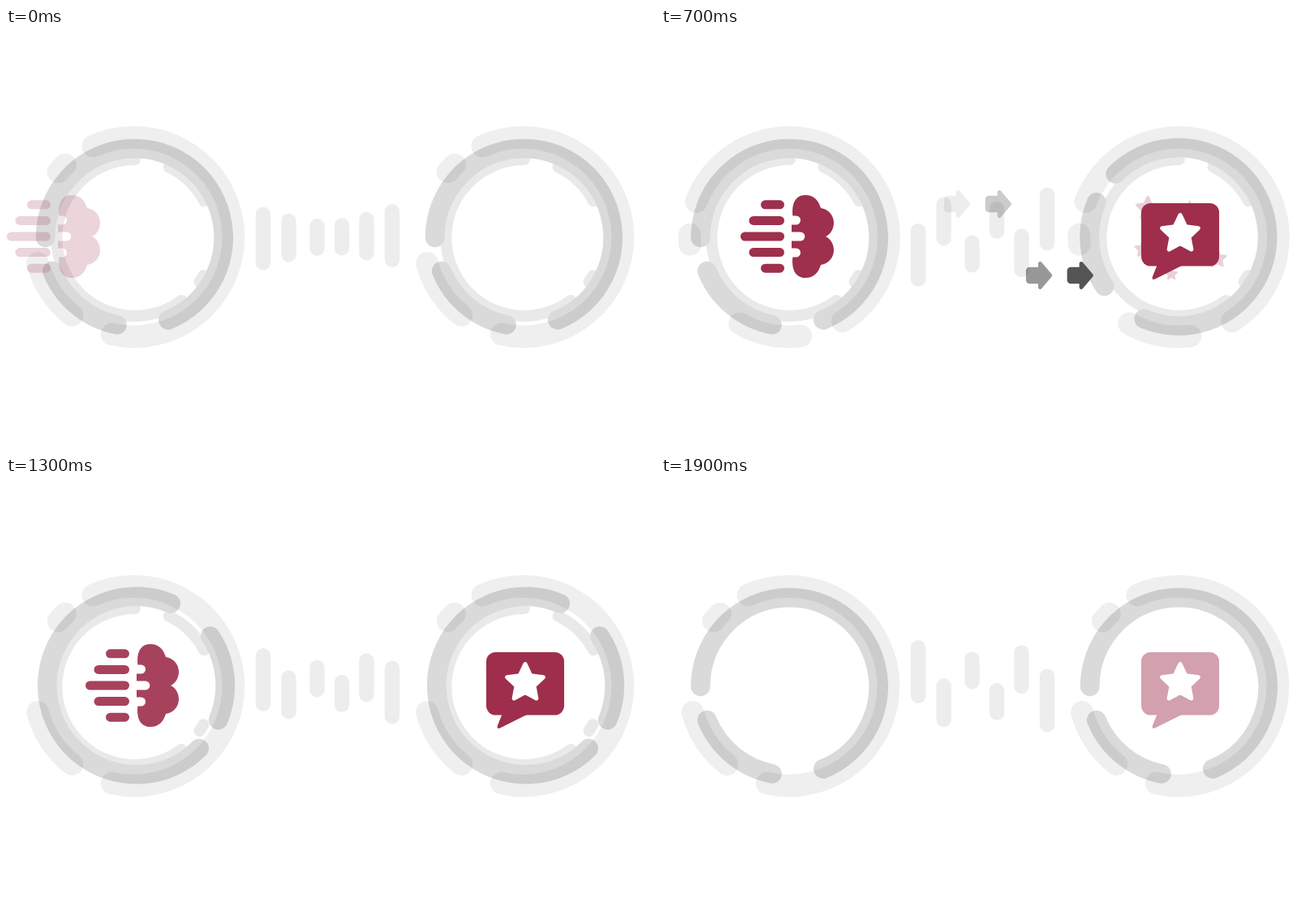
An HTML page that plays this animation: 800 by 519 pixels, repeating every 2 s.

```html
<!DOCTYPE html>
<html lang="en">
<head>
<meta charset="utf-8">
<title>Loop</title>
<style>
  html, body { margin: 0; width: 100%; height: 100%; overflow: hidden; background: #fff; }
  svg { display: block; width: 100vw; height: 100vh; }
  .ring path { fill: none; stroke-linecap: round; }
  .inner { stroke: #e9e9e9; stroke-width: 14; }
  .middle { stroke: #dadada; stroke-width: 23.8; }
  .outer { stroke: #000; stroke-opacity: .064; stroke-width: 27.8; }
  .red { fill: #9e2e4c; stroke: #9e2e4c; stroke-width: 0; }
  .white { fill: #fff; stroke: #fff; }
  #rays path { stroke-width: 8; stroke-linecap: round; }
  .star, .head { stroke-linejoin: round; }
  .head { stroke-width: 5; }
</style>
</head>
<body>
<svg viewBox="0 0 800 519">
  <g id="rings"></g>
  <g id="arrows"></g>
  <g id="bars" fill-opacity=".07"></g>
  <g id="brain" class="red">
    <path id="lobe" d="M162.300 231.500C160.500 213 168 206 178 206C188 206 194 212 197 222
      C206 223 213 231 213 240C213 248 209 254 203 257H177.300A5.500 5.500 0 0 0 171.800 251.500
      H161V242.500H166.500A5.500 5.500 0 0 0 166.500 231.500Z"/>
    <use href="#lobe" transform="matrix(1 0 0 -1 0 514)"/>
  </g>
  <g id="rays" class="red"></g>
  <g id="sparks" class="red"></g>
  <g id="bubble" class="red">
    <rect x="592" y="216" width="96" height="77.500" rx="11.500"/>
    <path d="M612.500 290L605.700 307Q605 311 609 309.500L643 292.500Z"/>
  </g>
</svg>
<script>
const $ = id => document.getElementById(id);
const show = (el, on) => { el.style.display = on ? '' : 'none'; };
const move = (el, transform) => el.setAttribute('transform', transform);
const ramp = (t, from, to) => Math.min(1, Math.max(0, (t - from) / (to - from)));

function add(parent, tag, attrs = {}) {
  const el = document.createElementNS('http://www.w3.org/2000/svg', tag);
  for (const key in attrs) el.setAttribute(key, attrs[key]);
  return parent.appendChild(el);
}

const polar = (r, deg) => {
  const a = deg * Math.PI / 180;
  return [r * Math.cos(a), r * Math.sin(a)];
};

function arc(r, from, to) {
  return `M${polar(r, from)}A${r} ${r} 0 ${to - from > 180 ? 1 : 0} 1 ${polar(r, to)}`;
}

function star(parent, x, y, r, kind = '') {
  const points = Array.from({ length: 10 }, (_, i) => polar(r * (i % 2 ? 0.44 : 0.9), i * 36 - 90));
  return add(parent, 'path', {
    class: `star ${kind}`, d: `M${points.join('L')}Z`,
    style: `stroke-width:${r * 0.2}`, transform: `translate(${x} ${y})`
  });
}

// Arc spans in degrees, clockwise from the right
function makeRing(x) {
  const ring = add($('rings'), 'g', { class: 'ring', transform: `translate(${x} 257)` });
  const layer = (name, cx, cy, r, ...spans) => {
    const spinner = add(ring, 'g');
    add(spinner, 'path', {
      class: name, transform: `translate(${cx} ${cy})`,
      d: spans.map(([from, to]) => arc(r, from, to)).join('')
    });
    return spinner;
  };
  return {
    inner: layer('inner', 0, 1.5, 96.5, [53.4, 270], [295.6, 332], [29, 34.4]),
    middle: layer('middle', -0.5, 1.3, 109.7, [180, 427.8], [101.3, 157.8]),
    outer: layer('outer', -1.4, 0.7, 122.8, [245.9, 462.6], [128.3, 164.8], [220.9, 226.5])
  };
}
const rings = [158.9, 638.9].map(makeRing);

// Bars grow towards both ends and neighbours swing in opposite directions
const bars = [317, 348.5, 383.5, 414, 444.5, 476].map((x, i) => {
  const u = Math.abs(i - 2.5) - 0.5;
  const height = 46 + 12 * u + 2 * u * u;
  return add($('bars'), 'rect', {
    x: x - 9.25, y: 259.4 - 0.68 * i - height / 2, width: 18.5, height, rx: 9.25
  });
});

const arrows = [];
function arrowRow(x, y, start) {
  for (let i = 0; i < 4; i++) {
    const level = Math.round(237 - 26 * i - 8.2 * i * i);
    const grey = `rgb(${level},${level},${level})`;
    const el = add($('arrows'), 'g', {
      transform: `translate(${x + 49.7 * i + i % 2} ${y})`, fill: grey, stroke: grey, 'stroke-width': 0
    });
    add(el, 'rect', { y: -10.3, width: 20, height: 20.6, rx: 4.5 });
    add(el, 'path', { class: 'head', d: 'M17.5 -14.5L29.8 0L17.5 14.5Z' });
    arrows.push({ el, from: start + i * 100 });
  }
}
arrowRow(308.5, 257, 100);
arrowRow(350.5, 305, 300);
arrowRow(349, 217, 600);

for (let k = -2; k <= 2; k++) {
  const x = 98 + 8.5 * Math.abs(k) + 2 * k * k;
  add($('brain'), 'rect', { x, y: 251.5 + 19.6 * k, width: 152 - x, height: 11, rx: 5.5 });
}

for (let i = 0; i < 8; i++) {
  add($('rays'), 'path', { d: 'M77 0h7', transform: `translate(155.6 255) rotate(${i * 45})` });
}

star($('bubble'), 640, 254, 26, 'white');

const sparks = [[586.5, 208.5, 16], [655.6, 206, 8.3], [689, 215, 6],
  [578.5, 275.5, 11.3], [701.5, 291.5, 12.3], [625.4, 317, 8.3]]
  .map(([x, y, r]) => ({ el: star($('sparks'), x, y, r), x, y }));

function drawRings(t) {
  const first = 360 * ramp(t, 0, 800);
  const second = 360 * ramp(t, 1000, 1800);
  rings.forEach((ring, i) => {
    move(ring.outer, `rotate(${first} -1 0)`);
    move(ring.middle, `rotate(${-second - (i ? first : 0)} .3 .2)`);
    show(ring.inner, t < 1800);
  });
}

function drawBars(t) {
  const sway = 25.5 * ramp(t, 0, 600) - 50 * ramp(t, 600, 1600) + 5 * ramp(t, 1600, 1900);
  bars.forEach((bar, i) => move(bar, `translate(0 ${i % 2 ? -sway : sway})`));
}

function drawBrain(t) {
  const local = t % 1000;
  const leave = t < 1000 ? 700 : 600;
  const fadeIn = 1 - 0.8 * 0.5 ** (local / 100);
  const fadeOut = Math.max(0, 1 - 0.0037 * (local - leave));
  move($('brain'), `translate(${-97 * (1 - ramp(local, 0, 280))})`);
  $('brain').setAttribute('opacity', Math.min(fadeIn, fadeOut));
  show($('rays'), local >= 400 && local < 600);
}

function drawBubble(t) {
  const size = 0.28 + 0.72 * ramp(t, 300, 600);
  move($('bubble'), `translate(592 310) scale(${size}) translate(-592 -310)`);
  $('bubble').setAttribute('opacity', ramp(t, 350, 600) * (1 - ramp(t, 1800, 1982)));
}

// Sparks spread out from behind the bubble
function drawSparks(t) {
  const step = (t < 1100 ? t - 800 : t - 1600) / 100;
  const spread = 0.17 * (step - 0.5);
  show($('sparks'), step >= -1 && step < 3);
  $('sparks').setAttribute('opacity', Math.max(0, 0.38 + 0.16 * step));
  sparks.forEach(({ el, x, y }) =>
    move(el, `translate(${x + (x - 640) * spread} ${y + (y - 264) * spread})`));
}

// Motion advances in 100 ms ticks
const begin = performance.now();
function loop() {
  const t = Math.floor((performance.now() - begin) % 2000 / 100) * 100;
  [drawRings, drawBars, drawBrain, drawBubble, drawSparks].forEach(draw => draw(t));
  arrows.forEach(({ el, from }) => show(el, t >= from && t < from + 300));
  requestAnimationFrame(loop);
}
loop();
</script>
</body>
</html>
```
